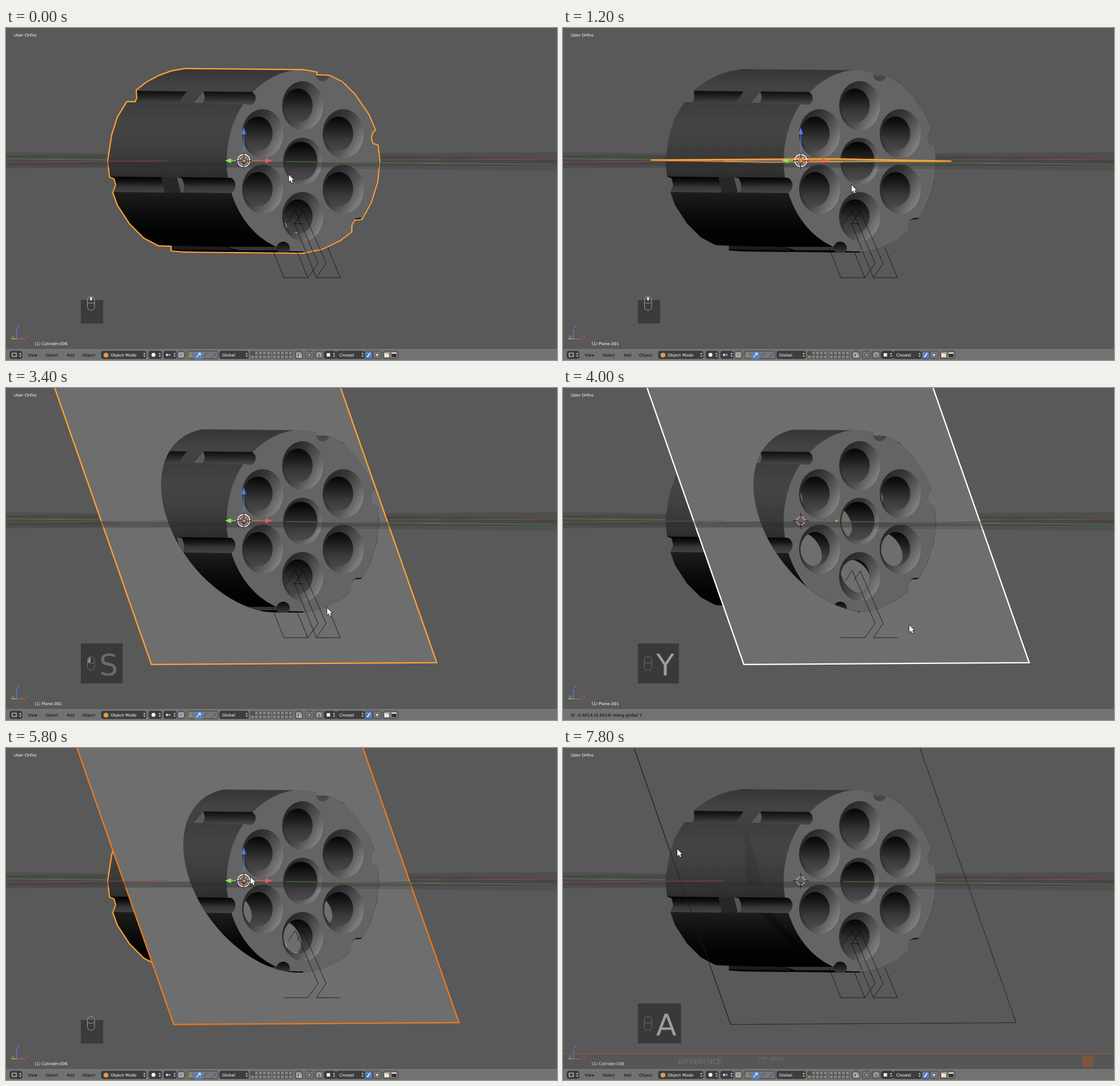
An HTML page with a canvas for the animation above (8 s loop, 964x581 px).

```html
<!DOCTYPE html>
<html lang="en">
<head>
<meta charset="utf-8">
<title>Cylinder slice</title>
<style>
html, body { margin: 0; width: 100%; height: 100%; overflow: hidden; background: #595959; }
canvas { display: block; }
</style>
</head>
<body>
<canvas id="stage" width="964" height="581"></canvas>
<script>
const c = document.getElementById('stage').getContext('2d');
const ORANGE = '#ffa235', PLANE = '#6e6e6e', CX = 416.5, CY = 232, TAU = Math.PI * 2;

// ---- helpers ----
const track = (keys, t) => {
  let i = 0;
  while (i < keys.length - 1 && t >= keys[i + 1][0]) i++;
  const a = keys[i], b = keys[i + 1];
  if (!b || t <= a[0]) return a.slice(1);
  return a.slice(1).map((v, n) => v + (b[n + 1] - v) * (t - a[0]) / (b[0] - a[0]));
};
const path = d => new Path2D('M' + d);
const oval = (x, y, rx, ry, from = 0, to = TAU) => {
  const p = new Path2D();
  p.ellipse(x, y, rx, ry, 0, from, to);
  return p;
};
const fill = (p, color) => { c.fillStyle = color; c.fill(p); };
const stroke = (p, color, width = 1) => { c.strokeStyle = color; c.lineWidth = width; c.stroke(p); };
const rect = (x, y, w, h, color) => { c.fillStyle = color; c.fillRect(x, y, w, h); };
const text = (s, x, y, color, size = 7.2) => {
  c.font = `${size}px "DejaVu Sans", sans-serif`;
  c.fillStyle = color;
  c.fillText(s, x, y);
};
const ramp = (x0, y0, x1, y1, ...stops) => {
  const g = c.createLinearGradient(x0, y0, x1, y1);
  stops.forEach((s, i) => g.addColorStop(i / (stops.length - 1), s));
  return g;
};
const clipped = (p, draw) => { c.save(); c.clip(p); draw(); c.restore(); };
const box = (x, y, w, h) => { const p = new Path2D(); p.rect(x, y, w, h); return p; };

// ---- motion ----
const POINTER = [[0, 495, 257], [1200, 505, 275], [1600, 505, 275], [2600, 475, 497], [2800, 490, 330],
  [3400, 562, 385], [3600, 560, 385], [4200, 629, 430], [4600, 609, 426], [5000, 601, 424],
  [5800, 428, 226], [6800, 428, 226], [7600, 225, 158], [7800, 200, 177]];
const ANGLE = [[1400, 0], [2400, 57]];
const SCALE = [[2600, 1], [3200, 1.56]];
const SHIFT = [[3600, 0], [3800, 43], [4000, 62], [4200, 68], [4600, 47], [5000, 39]];
const KEYS = [[1600, 2200, 'R'], [2800, 3600, 'S'], [3600, 3800, 'G'], [3800, 4400, 'Y'],
  [6600, 7400, 'Ctrl + NUMPAD_MINUS'], [7400, 8600, 'A']];

// ---- cylinder ----
const silhouette = path('313 72 290 76 268 84 247 95 229 109 230 122 227 130 212 130 196 156 186 187 179 232 ' +
  '182 260 190 263 193 275 188 288 196 310 217 342 242 367 267 380 290 381 290 389 313 391 520 393 553 386 ' +
  '584 371 604 356 604 345 609 335 622 334 638 305 649 270 653 233 650 206 641 203 638 192 641 182 645 178 ' +
  '634 152 610 117 588 95 566 84 543 83 543 78 520 74Z');
const holes = [[519, 136], [449, 185], [590, 185], [449, 282], [590, 282], [519, 330], [519, 233]];

function drawHole([x, y], slant, shift, planeCut) {
  const mid = x === 519 && y === 233, rx = mid ? 34 : 36, ry = mid ? 41 : 43;
  fill(oval(x, y, rx, ry), ramp(x - rx, y - ry * .5, x + rx, y + ry * .5, '#262626', '#353535', '#585858', '#898989'));
  const inner = mid ? oval(516, y, 29, 34) : oval(x - 8, y, 25.5, 30);
  fill(inner, ramp(0, y - 31, 0, y + 31, '#050505', '#1d1d1d', '#393939', '#4a4a4a'));
  if (!planeCut) return;
  const cx = CX + shift + x - 519 + slant * (y - 233), cut = new Path2D();
  for (let a = 0; a < TAU; a += .15) cut.lineTo(cx + 25 * Math.sin(a) - slant * 30 * Math.cos(a), y - 30 * Math.cos(a));
  clipped(inner, () => fill(cut, PLANE));
}

function drawCylinder(s, planeCut) {
  clipped(silhouette, () => {
    rect(170, 65, 490, 335, ramp(0, 72, 0, 392, '#353535', '#444444', '#3d3d3d', '#454545', '#404040', '#393939',
      '#2b2b2b', '#191919', '#0b0b0b', '#030303', '#000'));
    if (s.wire) {
      fill(path('316 150 324 150 350 240 322 240Z'), 'rgba(0,0,0,.1)');
      fill(path('345 289 365 289 430 365 402 345Z'), 'rgba(0,0,0,.3)');
    }
    fill(oval(519, 233, 133, 160), '#646464');
    // upper groove
    const high = ramp(0, 110, 0, 133, '#0c0c0c', '#272727', '#474747');
    fill(path('227 110 316 111 301 132 227 130Z'), high);
    fill(path('317 111 334 111 331 131 301 132Z'), '#424242');
    fill(path('345 111 428 112 428 134 345 132Z'), high);
    fill(oval(427, 123, 10, 11.5), high);
    fill(path('345 111 348 121 345 131 329 131Z'), '#5a5a5a');
    // middle groove
    const low = ramp(0, 260, 0, 289, '#000', '#161616', '#393939', '#444');
    fill(path('182 260 272 261 278 288 188 287Z'), low);
    fill(path('272 261 300 261 307 288 278 288Z'), '#272727');
    fill(path('301 261 391 262 391 289 313 288Z'), low);
    fill(oval(391, 275.5, 10.5, 13.5), low);
    fill(path('299 261 308 263 312 275 311 288 306 288Z'), '#555');
    // lower groove
    fill(path('290 381 385 383 400 389 313 391 290 389Z'), '#1c1c1c');
    fill(path('386 383 473 383 476 389 408 389Z'), '#353535');
    fill(path('290 387 520 391 520 394 290 392Z'), '#070707');
    fill(oval(485, 385, 11.5, 11), ramp(0, 374, 0, 394, '#0a0a0a', '#3d3d3d'));
    fill(oval(554, 82, 11.5, 11), '#474747');
    fill(path('606 337 612 333 622 332 620 335Z'), '#080808');
    holes.forEach(h => drawHole(h, s.slant, s.shift, planeCut));
  });
}

// Everything on the viewer's side of the slanted plane.
function frontRegion(s) {
  const p = new Path2D();
  for (let i = 0; i <= 40; i++) {
    const a = i / 40 * Math.PI;
    p.lineTo(CX + s.shift - 134 * Math.sin(a) - s.slant * 160 * Math.cos(a), CY - 161 * Math.cos(a));
  }
  p.lineTo(1400, 393);
  p.lineTo(1400, 71);
  return p;
}

// ---- plane ----
function planeCorners(s) {
  const cos = Math.cos(s.angle), sin = Math.sin(s.angle);
  const ux = -103 * cos, uy = -2 * cos - 190 * sin;
  return [[-1, 1], [1, 1], [1, -1], [-1, -1]].map(([a, b]) =>
    [CX + s.shift + s.scale * (160 * a + ux * b), CY + s.scale * (-a + uy * b)]);
}
const planePath = s => path(planeCorners(s).join(' ') + 'Z');

// ---- floor grid, drawn half behind and half in front ----
function drawGrid(front) {
  const line = (k, off, color, from = -10, to = 974) =>
    stroke(path(`${from} ${CY + off + (from - CX) * k} ${to} ${CY + off + (to - CX) * k}`), color);
  clipped(box(0, front ? 234 : 0, 964, front ? 347 : 234), () => {
    for (let i = -5; i <= 5; i++) {
      line(-.0055, i * 2.1, 'rgba(45,45,45,.5)');
      line(.0105, i * 2.1 + 1, 'rgba(45,45,45,.4)');
    }
  });
  const red = '#8c4a46', green = '#4a8a3c';
  if (front) {
    line(-.0055, 0, red, 0, 282);
    line(.0105, 1, green, 490, 964);
  } else {
    line(-.0055, 0, red, 650, 964);
    line(.0105, 1, green, 0, 282);
  }
}

function drawBolts(partial) {
  const color = 'rgba(10,10,10,.85)';
  for (const d of ['494 338 506 319 546 412 528 437 486 437', '509 337 520 320 560 412 543 437 585 437'])
    stroke(path(d), color, .9);
  if (!partial) stroke(path('466 386 486 437M510 393 528 437M563 384 585 437M494 338 489 344M519 320 505 343 ' +
    '543 437M503 342.5 519 342.5'), color, .9);
}

function drawGizmo(s) {
  const x = 416;
  if (s.gizmo) {
    const g = 416 + (s.cylSelected ? 0 : s.shift);
    const arrow = (line, head, color) => { stroke(path(line), color, 1.2); fill(path(head + 'Z'), color); };
    arrow(`${g} 222 ${g} 186`, `${g - 4} 186 ${g} 174 ${g + 4} 186`, '#4f7fe8');
    arrow(`${g - 10} 232 ${g - 22} 232`, `${g - 22} 228 ${g - 33} 232 ${g - 22} 236.5`, '#83ee55');
    arrow(`${g + 10} 232 ${g + 38} 232`, `${g + 38} 228 ${g + 50} 232 ${g + 38} 236.5`, '#ef5d55');
    stroke(oval(g, 232, 10.5, 10.5), '#fff', 1.3);
  }
  stroke(oval(x, 232.5, 7, 7), '#fff', 1.2);
  c.setLineDash([2.75, 2.75]);
  stroke(oval(x, 232.5, 7, 7), '#e03c30', 1.2);
  c.setLineDash([]);
  stroke(path(`${x - 14} 232.5h9m10 0h9M${x} 218.5v9m0 10v9`), '#111');
  if (s.gizmo || s.modal) fill(oval(CX + (s.cylSelected ? 0 : s.shift), 232.5, 2, 2), '#f49a35');
}

// ---- interface ----
function drawOverlays(s, t) {
  text('User Ortho', 14, 15, '#fff');
  stroke(path('18.5 544V527'), '#4f7fe8', 1.3);
  stroke(path('18.5 544H9'), '#83d955', 1.3);
  stroke(path('18.5 544H33'), '#d9564f', 1.3);
  text('z', 20, 525, '#5f85e0');
  text('y', 10, 542, '#83d955');
  text('x', 35, 542, '#d9564f');
  text(`(1) ${t >= 800 && t < 5600 ? 'Plane.001' : 'Cylinder.006'}`, 50, 555, '#fff');

  if (t >= 6600) {
    c.globalAlpha = 1 - (t - 6600) / 1200 * .58;
    rect(0, 536, 964, 26, `rgba(66,66,66,${t < 7800 ? .82 : .3})`);
    rect(0, 534, 964, 2.2, '#b4532b');
    text('DIFFERENCE', 201, 553, '#999', 12.3);
    text('TYPE: BMESH', 341, 546, '#999', 6.9);
    rect(908, 539, 20, 20, '#b4532b');
    c.globalAlpha = 1;
  }

  const key = KEYS.find(k => t >= k[0] && t < k[1]);
  if (key) {
    c.font = '52px "DejaVu Sans", sans-serif';
    rect(131, 447, c.measureText(key[2]).width + 40, 70, 'rgba(38,38,38,.62)');
    const age = (t - key[0]) / (key[1] - key[0]);
    text(key[2], 163, 503, `rgba(178,178,178,${key[2] === 'S' ? .9 - age * .65 : .9 - age * .2})`, 52);
  } else rect(131, 476, 39, 41, '#3b3b3b');
  const mouse = new Path2D();
  mouse.roundRect(142.5, 470, 12.5, 24, 6);
  stroke(mouse, key ? '#777' : '#a5a5a5', .9);
  stroke(path('142.5 480Q149 484 155 480'), key ? '#777' : '#a5a5a5', .9);
  if (t < 1600) fill(oval(148.8, 474, 1.5, 3), '#fff');
  if (t === 2600 || t === 3400 || t === 5200)
    fill(path('148 471Q143 472 143 480L148 481Z'), t === 3400 ? '#8a8a8a' : '#fff');
}

function drawHeader(s) {
  rect(0, 562, 964, 19, '#727272');
  rect(0, 562, 964, 1, '#7f7f7f');
  if (s.modal) return text(s.status, 14, 575, '#050505');
  const chip = (x, w, color) => {
    const p = new Path2D();
    p.roundRect(x, 565.5, w, 13, 3);
    fill(p, color);
    stroke(p, '#2c2c2c', .7);
  };
  const drop = (x, w, label, indent) => {
    chip(x, w, '#3d3d3d');
    if (label) text(label, x + indent, 575, '#fff');
    fill(path(`${x + w - 5} 571l2-3 2 3zM${x + w - 5} 573l2 3 2-3z`), '#c0c0c0');
  };
  const dot = (x, color, r = 4) => { fill(oval(x, 572, r, r), color); stroke(oval(x, 572, r, r), '#222', .7); };
  drop(7, 21);
  stroke(path('11 569h7v6h-7z'), '#ddd', 1.2);
  ['View', 'Select', 'Add', 'Object'].forEach((s, i) => text(s, [38, 69, 106, 133][i], 575, '#080808'));
  drop(167, 78, 'Object Mode', 16);
  fill(path('171 570l4-2 4 2v5l-4 2-4-2z'), '#e89a45');
  drop(250, 22);
  dot(258, '#f2f2f2');
  drop(276, 22);
  dot(282, '#dce8ff', 2.6);
  dot(286, '#6b9bea', 2.6);
  chip(300, 13, '#777');
  stroke(path('303 569h7v6h-7zm2 3h3'), '#eee');
  chip(317, 54, '#777');
  stroke(path('323 568v5l-4 3m4-3 4 3'), '#dd903c', 1.3);
  rect(330, 566, 14, 13, '#5681bd');
  stroke(path('333 576l7-7m-4 0h4v4'), '#fff', 1.2);
  stroke(path('347 576q1-7 7-7M361 576l7-7'), '#3d5880', 1.2);
  drop(374, 50, 'Global', 4);
  for (let i = 0; i < 20; i++) {
    const x = 428 + i % 10 * 7 + (i % 10 > 4 ? 3.5 : 0), y = 566 + (i > 9 ? 6.5 : 0);
    rect(x, y, 6.2, 5.8, i ? '#858585' : '#555');
    stroke(box(x, y, 6.2, 5.8), '#333', .6);
  }
  dot(437, ORANGE, 1.3);
  chip(506, 13, '#777');
  stroke(path('509 569h5v7h-5zm5 3h3v4h-3z'), '#ddd');
  chip(524, 14, '#777');
  dot(531, '#8c8c8c', 3.5);
  chip(541, 14, '#777');
  stroke(path('545 575v-4q3-5 6 0v4'), '#bbb', 1.5);
  drop(557, 20);
  rect(561, 569, 6, 6, '#eee');
  drop(578, 49, 'Closest', 5);
  chip(628, 13, '#5681bd');
  stroke(path('632 576l5-7'), '#fff', 1.6);
  chip(642, 14, '#777');
  dot(649, '#ccc', 3);
  chip(660, 26, '#777');
  rect(662, 569, 8, 7, '#e8e8e8');
  rect(665, 567, 6, 3, '#d78b42');
  rect(675, 569, 8, 7, '#333');
  rect(675, 568, 8, 2, '#eee');
}

function drawPointer(t) {
  const [x, y] = track(POINTER, t);
  const arrow = path(`${x} ${y}v12l2.8-2.6 2 4.5 2-.9-2-4.3h3.7z`);
  stroke(arrow, '#222', 1.6);
  fill(arrow, '#fff');
}

function stateAt(t) {
  const degrees = track(ANGLE, t)[0], [scale] = track(SCALE, t), [shift] = track(SHIFT, t);
  const angle = degrees * Math.PI / 180;
  const between = (a, b) => t >= a && t < b;
  const modal = between(1600, 2600) || between(2800, 3400) || between(3600, 5200);
  const d = (shift * .0097).toFixed(4), k = scale.toFixed(4);
  return {
    angle, scale, shift, modal,
    slant: angle ? .542 / Math.tan(angle) : 0,
    plane: between(800, 6600),
    wire: t >= 6600,
    cylSelected: t < 800 || between(5600, 7400),
    gizmo: !modal && t < 7400,
    status: t < 2600 ? `Rot: ${degrees.toFixed(2)} along global X`
      : t < 3400 ? `Scale X: ${k}  Y: ${k}  Z: ${k}`
      : `D: -${d} (${d}) along global Y`
  };
}

function render(t) {
  const s = stateAt(t), slab = planePath(s);
  const edge = s.modal ? '#fff' : s.cylSelected ? '#f07818' : ORANGE;
  rect(0, 0, 964, 581, '#595959');
  drawGrid(false);
  if (s.wire) stroke(slab, '#1c1c1c', .9);
  if (s.cylSelected) stroke(silhouette, ORANGE, 4.4);
  drawCylinder(s, false);
  if (s.plane) {
    fill(slab, PLANE);
    stroke(slab, edge, 2.3);
    if (s.angle) clipped(frontRegion(s), () => drawCylinder(s, true));
  }
  if (s.wire) {
    const [a, , , b] = planeCorners(s);
    stroke(path(`${a} ${b}`), '#1c1c1c', .9);
  }
  drawGrid(true);
  drawBolts(s.plane && s.shift > 20);
  if (s.cylSelected) stroke(path('489 341l2 8M505 358h6'), ORANGE, 1.2);
  drawGizmo(s);
  drawOverlays(s, t);
  drawHeader(s);
  drawPointer(t);
}

function tick() {
  render(Math.floor(performance.now() % 8000 / 200) * 200);
  requestAnimationFrame(tick);
}
tick();
</script>
</body>
</html>
```
